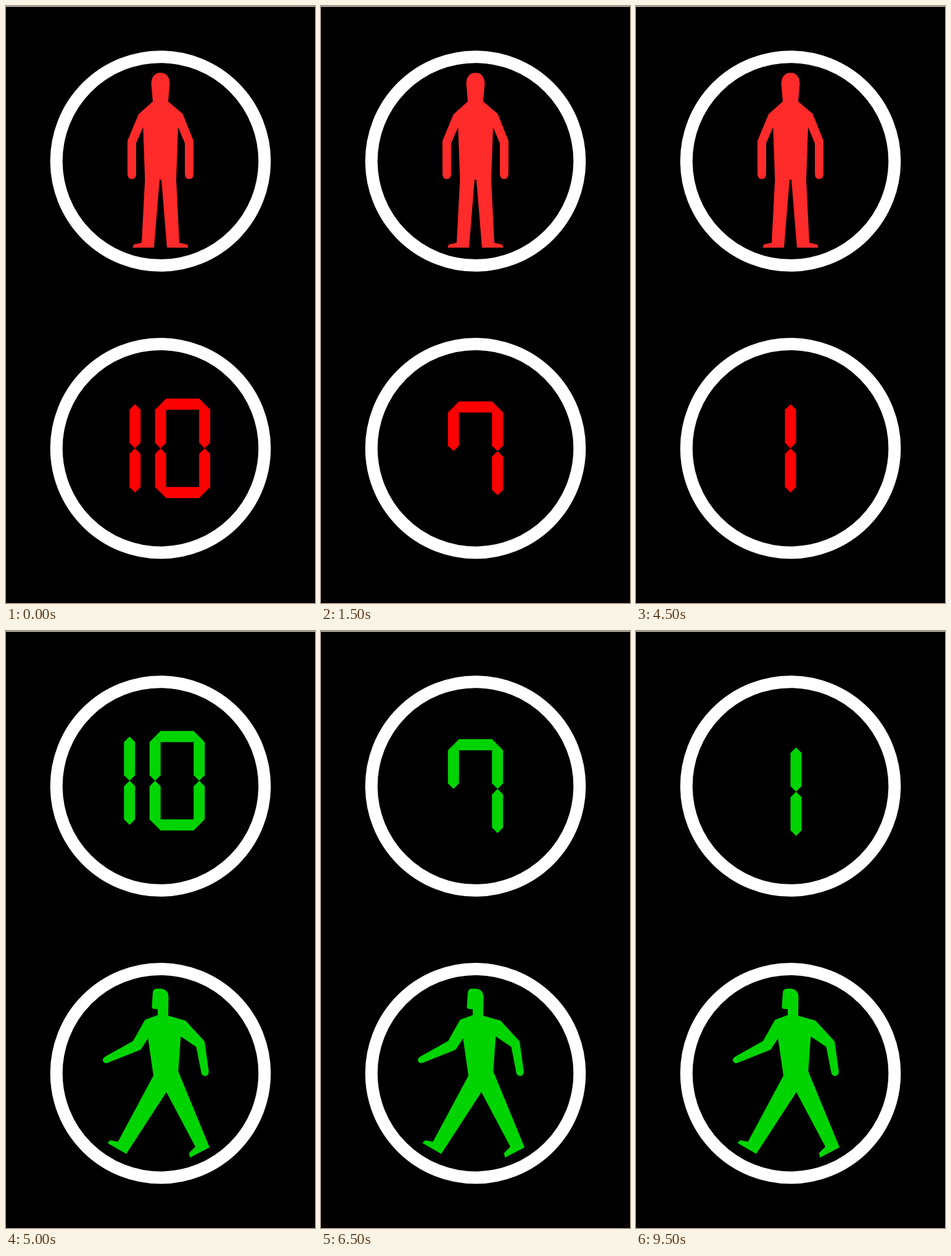
These frames come from a looping animation (501 px wide and 966 px high, 10 s). An HTML page:

```html
<!DOCTYPE html>
<html lang="en">
<head>
<meta charset="utf-8">
<title>Pedestrian signal</title>
<style>
  html, body { margin: 0; width: 100%; height: 100%; overflow: hidden; background: #000; }
  svg { display: block; width: 100%; height: 100%; }
  .ring { fill: none; stroke: #fff; stroke-width: 20; }
</style>
</head>
<body>
<svg viewBox="0 0 501 966">
  <rect width="501" height="966"/>
  <rect width="501" height="1" fill="#fff"/>
  <circle class="ring" cx="250.5" cy="251" r="168.8"/>
  <circle class="ring" cx="250.5" cy="715.7" r="168.8"/>
  <path id="stand" fill="#ff2a2a" d="M238 154.500L235.500 125C236 114 242 108 250.500 108S265 114 265.500 125L263 154.500L286.500 174.500L304 218V271Q304 280 297 280T290 271V222L279 196L276 281L281 383L294 386L295.500 391H261L252 281H249L240 391H205.500L207 386L220 383L225.300 281L222.300 196L211 222V271Q211 280 204 280T197 271V218L215 175Z"/>
  <path id="walk" fill="#00d400" d="M238 585Q239 579 244 578.700H249C258 578.700 263.500 584 263.500 592L263 622.500L291 630.500L322 664L328.700 712Q329 719.500 323 720Q318 720 316.700 715L308.500 673L283.300 656L279.300 712.500L330 835.500L298.500 852L296.500 845L307 834.500L260 746L195 846L164.500 828.500L169 824L181.500 826.500L239 719.500L230.300 659L218.300 677.500L164 699Q159 700 157 695.500Q156 691.500 162 688L206 663.500L225.500 629L246 621.500V612L240 611.500Q236.500 611 236.500 608Z"/>
  <g id="count"></g>
</svg>
<script>
const STEP = 500, LEN = 71.5, HALF = 9, MID_X = 250.5;
const stand = document.getElementById('stand');
const walk = document.getElementById('walk');
const count = document.getElementById('count');

// Lit segments of each figure: a top, then clockwise to f, g middle
const LIT = ['abcdef', 'bc', 'abdeg', 'abcdg', 'bcfg', 'acdfg', 'acdefg', 'abcf', 'abcdefg', 'abcdfg'];
// Segment start in units of LEN from the left end of the middle bar
const SEG = { a: [0, -1], b: [1, -1], c: [1, 0], d: [0, 1], e: [0, 0], f: [0, -1], g: [0, 0] };

function bar(name, x, y) {
  const across = 'adg'.includes(name);
  const [u, v] = SEG[name];
  const pts = [[0, 0], [HALF, -HALF], [LEN - HALF, -HALF], [LEN, 0], [LEN - HALF, HALF], [HALF, HALF]];
  const list = pts.map(([p, q]) =>
    (x + u * LEN + (across ? p : q)) + ',' + (y + v * LEN + (across ? q : p)));
  return `<polygon points="${list.join(' ')}"/>`;
}

const figure = (n, x, y) => [...LIT[n]].map(s => bar(s, x, y)).join('');

function number(n, green) {
  const y = green ? 251 : 715.7;
  if (n === 10) {
    const x = green ? 241.7 : 250.6, top = green ? y - 8.8 : y;
    return figure(1, x - 41.4 - LEN, top) + figure(0, x, top);
  }
  if (n === 1) {
    const shift = green ? 9 : 0;
    return figure(1, MID_X + shift - LEN, y + shift);
  }
  return figure(n, MID_X - LEN / 2, n === 7 ? y + 4.5 : y);
}

let shown = -1;
function draw(now) {
  const step = Math.floor(now / STEP) % 20;
  if (step !== shown) {
    const green = step >= 10;
    stand.style.display = green ? 'none' : '';
    walk.style.display = green ? '' : 'none';
    count.setAttribute('fill', green ? '#00d400' : '#f00');
    count.innerHTML = number(10 - step % 10, green);
    shown = step;
  }
}

function tick(now) {
  draw(now);
  requestAnimationFrame(tick);
}
draw(0);
requestAnimationFrame(tick);
</script>
</body>
</html>
```
